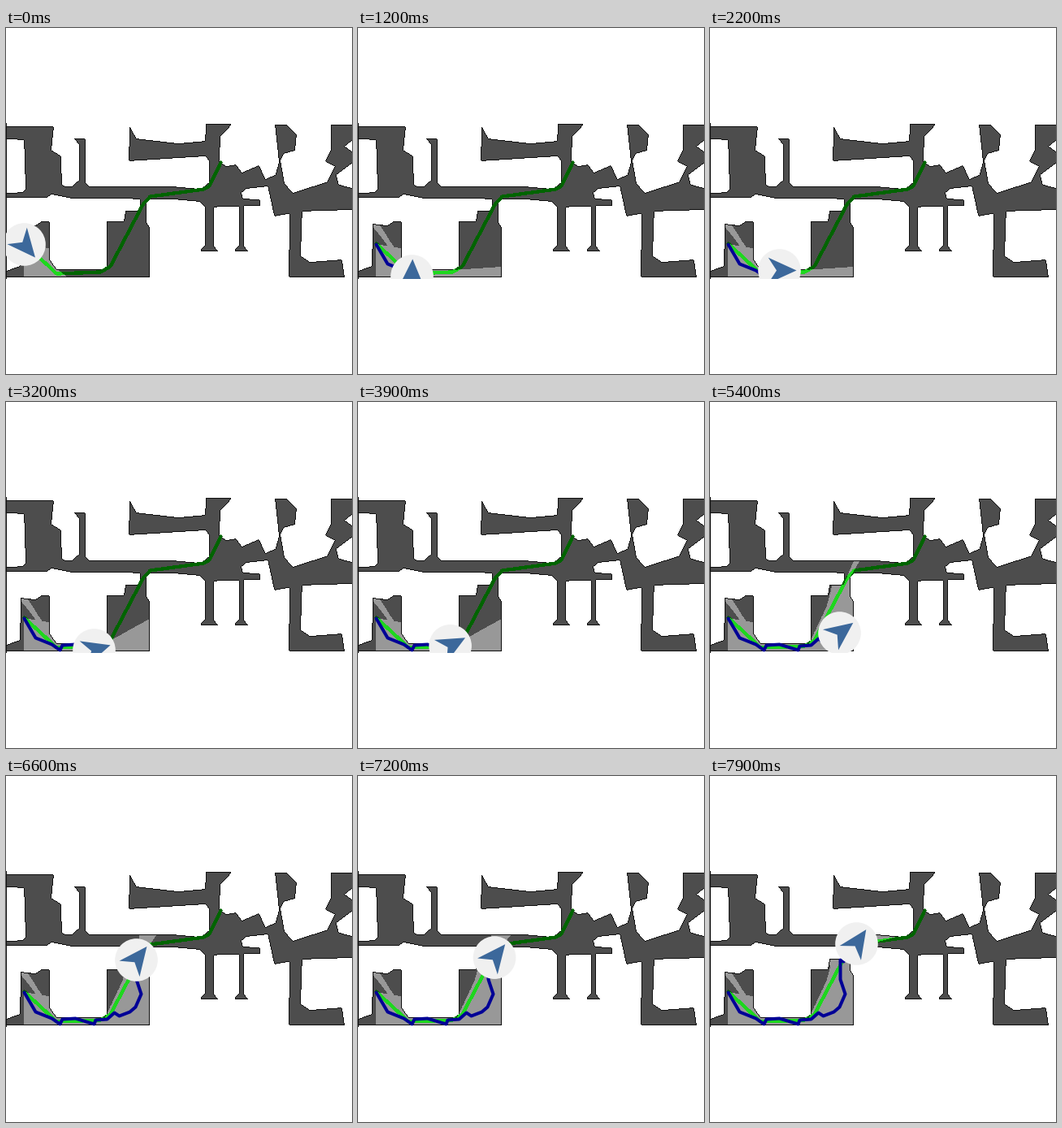
Animation of 426 by 426 pixels, one loop 8 s. Source, as a matplotlib script:

```python
import numpy as np
import matplotlib.pyplot as plt
from matplotlib.animation import FuncAnimation
from matplotlib.patches import Circle, Polygon, Rectangle
from matplotlib.path import Path

SIZE, DPI = 426, 64
PX = 72 / DPI
FRAMES, STEP = 80, 100
HALF_VIEW = 40  # degrees the robot sees to either side

WALL, FLOOR, SEEN = (15,) * 3, (77,) * 3, (152,) * 3
ROUTE, ROUTE_SEEN = (0, 100, 0), (30, 215, 30)


def leg(left, right):
    return [(left, 212), (right, 212), (right, 267), (right + 5, 274),
            (left - 6, 274), (left, 267)]


west_hall = [(0, 121), (58, 121), (55, 150), (67, 157), (68, 192), (80, 200),
             (20, 203), (24, 198), (22, 137), (0, 136)]
closet = [(84, 136), (97, 136), (97, 190), (104, 196), (80, 196), (90, 187),
          (90, 144)]
corridor = [(0, 203), (24, 202), (68, 195), (205, 195), (260, 200),
            (247, 222), (237, 213), (205, 210), (80, 209), (55, 204),
            (49, 208), (0, 208)]
north_hall = [(152, 121), (160, 136), (212, 142), (245, 139), (246, 118),
              (277, 118), (263, 133), (262, 165), (262, 200), (240, 198),
              (250, 190), (250, 164), (245, 157), (151, 163)]
hub = [(262, 164), (271, 170), (283, 168), (290, 178), (311, 169),
       (319, 186), (333, 180), (353, 203), (396, 189), (426, 197),
       (426, 223), (362, 225), (330, 231), (322, 194), (295, 197),
       (289, 202), (291, 210), (312, 211), (312, 218), (246, 220),
       (250, 190)]
alcove = [(331, 119), (345, 119), (357, 130), (355, 150), (341, 154),
          (337, 162), (342, 190), (329, 190), (336, 165)]
north_east = [(400, 119), (426, 119), (426, 137), (416, 145), (426, 152),
              (426, 165), (406, 180), (409, 193), (394, 192), (405, 170),
              (393, 164), (400, 150)]
south_east = [(349, 222), (364, 222), (362, 280), (374, 288), (413, 285),
              (416, 306), (348, 306)]
start_room = [(18, 241), (36, 243), (44, 238), (53, 238), (53, 284),
              (62, 297), (120, 297), (120, 306), (0, 306), (0, 299),
              (17, 293)]
south_room = [(124, 238), (145, 238), (147, 225), (165, 225), (165, 200),
              (178, 200), (172, 215), (172, 238), (176, 245), (176, 306),
              (118, 306), (124, 292)]
rooms = [west_hall, closet, corridor, north_hall, hub, alcove, north_east,
         south_east, start_room, south_room, leg(245, 255), leg(287, 292)]

route = [(22, 265), (62, 302), (116, 300), (128, 293), (168, 217),
         (177, 207), (243, 198), (250, 194), (264, 165)]

# Robot way points: time in ms, x, y, heading in degrees
poses = np.array([
    (0, 22, 266, 50), (500, 36, 290, 50), (1000, 56, 298, 15),
    (1200, 66, 305, -88), (1600, 69, 299, -40), (2200, 85, 298, 0),
    (3200, 108, 305, -17), (3700, 110, 300, -30), (4600, 124, 299, -23),
    (4800, 133, 291, -35), (5000, 139, 295, -20), (5200, 152, 290, -21),
    (5400, 159, 284, -37), (5800, 166, 268, -60), (6200, 160, 250, -85),
    (6600, 160, 226, -52), (7000, 164, 228, -50), (7900, 180, 206, -56),
])

yy, xx = np.mgrid[:SIZE, :SIZE]
pixels = np.column_stack([xx.ravel(), yy.ravel()])


def fill(points):
    path = Path(points + points[:1])
    hit = path.contains_points(pixels - 0.4) | path.contains_points(pixels + 0.4)
    return hit.reshape(SIZE, SIZE)


def near_line(points, reach):
    hit = np.zeros((SIZE, SIZE), bool)
    for (x0, y0), (x1, y1) in zip(points, points[1:]):
        dx, dy = x1 - x0, y1 - y0
        u = ((xx - x0) * dx + (yy - y0) * dy) / (dx * dx + dy * dy)
        u = np.clip(u, 0, 1)
        hit |= np.hypot(xx - x0 - u * dx, yy - y0 - u * dy) <= reach
    return hit


def pose_at(t):
    return [np.interp(t, poses[:, 0], col) for col in poses.T[1:]]


def visible(x, y, heading):
    """Cast a fan of rays that stop at the first wall."""
    ang = np.radians(heading + np.linspace(-HALF_VIEW, HALF_VIEW, 400))[:, None]
    dist = np.arange(0, 280, 0.7)
    col = np.clip(np.rint(x + dist * np.cos(ang)), 0, SIZE - 1).astype(int)
    row = np.clip(np.rint(y + dist * np.sin(ang)), 0, SIZE - 1).astype(int)
    free = floor[row, col] | (dist < 6)
    free = np.logical_and.accumulate(free, axis=1)
    hit = np.zeros_like(floor)
    hit[row[free], col[free]] = True
    return hit & floor


floor = np.any([fill(room) for room in rooms], axis=0)
pad = np.pad(floor, 1, mode="edge")
inner = pad[:-2, 1:-1] & pad[2:, 1:-1] & pad[1:-1, :-2] & pad[1:-1, 2:]
edge = floor & ~inner
on_route = near_line(route, 2.2)

first_seen = np.full((SIZE, SIZE), FRAMES)
for k in reversed(range(FRAMES)):
    first_seen[visible(*pose_at(k * STEP))] = k


def scene(i):
    seen = first_seen <= i
    img = np.full((SIZE, SIZE, 3), 255, np.uint8)
    img[floor] = FLOOR
    img[seen] = SEEN
    img[edge] = WALL
    img[on_route] = ROUTE
    img[on_route & seen] = ROUTE_SEEN
    img[117:309, 0] = WALL
    return img


def arrow_shape(x, y, heading):
    ang = np.radians(heading + np.array([0, 131, 180, -131]))
    rad = np.array([21, 21, 3.5, 21])
    return np.column_stack([x + rad * np.cos(ang), y + rad * np.sin(ang)])


fig = plt.figure(figsize=(SIZE / DPI, SIZE / DPI), dpi=DPI, facecolor="white")
ax = fig.add_axes([0, 0, 1, 1])
ax.axis("off")
picture = ax.imshow(scene(0), interpolation="nearest", aspect="auto")
ax.set_xlim(-0.5, SIZE - 0.5)
ax.set_ylim(SIZE - 0.5, -0.5)

view = Rectangle((-0.5, 117), SIZE, 191.5, transform=ax.transData)
trail = ax.plot([], [], color="#000096", lw=4 * PX, solid_joinstyle="round",
                solid_capstyle="round", zorder=2)[0]
disc = ax.add_patch(Circle((0, 0), 26.3, fc="#f0f0f0", ec="none", zorder=3))
arrow = ax.add_patch(Polygon(arrow_shape(0, 0, 0), fc="#3c689b", ec="none",
                             zorder=4))
for part in (trail, disc, arrow):
    part.set_clip_path(view)


def draw(i):
    t = i * STEP
    x, y, heading = pose_at(t)
    past = poses[poses[:, 0] <= t, 1:3]
    picture.set_data(scene(i))
    trail.set_data(np.append(past[:, 0], x), np.append(past[:, 1], y))
    disc.center = x, y
    arrow.set_xy(arrow_shape(x, y, heading))
    return []


anim = FuncAnimation(fig, draw, frames=FRAMES, interval=STEP, repeat=True,
                     repeat_delay=0, blit=False)
plt.show()
```
